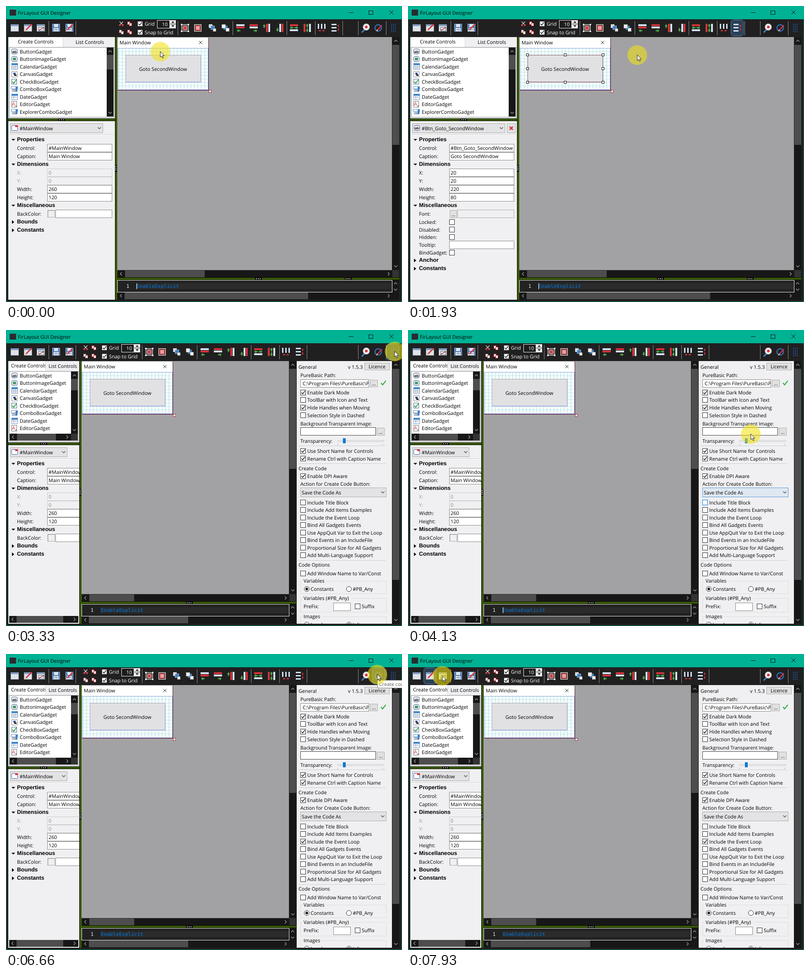
An HTML page that plays this animation: 865x648 px, repeating every 8 s.

```html
<!DOCTYPE html>
<html>
<head>
<meta charset="utf-8">
<style>
html, body { margin: 0; width: 865px; height: 648px; overflow: hidden; background: #1f1f1f; }
svg { display: block; }
text { font: 10.75px "Open Sans", "Noto Sans", sans-serif; text-rendering: geometricPrecision; white-space: pre; }
.b { font: bold 12.2px "Liberation Sans", sans-serif; }
.m { font: 11px "DejaVu Sans Mono", monospace; }
.k { font-weight: bold; }
</style>
</head>
<body>
<svg id="stage" width="865" height="648" viewBox="0 0 865 648"></svg>
<script>
const DARK = '#202020', FACE = '#f0f0f2', GREY = '#a2a2a4', RED = '#d8323c', BLUE = '#3f82c8', GREEN = '#4fae4a';

const rect = (x, y, w, h, fill, stroke, more = '') => stroke
  ? `<rect x="${x + .5}" y="${y + .5}" width="${w - 1}" height="${h - 1}" fill="${fill}" stroke="${stroke}" ${more}/>`
  : `<rect x="${x}" y="${y}" width="${w}" height="${h}" fill="${fill}" ${more}/>`;
const path = (d, stroke, width = 1, fill = 'none') =>
  `<path d="${d}" stroke="${stroke}" stroke-width="${width}" fill="${fill}"/>`;
// y is the middle of the line
const text = (x, y, s, fill = '#000', more = '') =>
  `<text x="${x}" y="${y + 4}" fill="${fill}" ${more}>${s}</text>`;
const mid = 'text-anchor="middle"';
const group = (id, body) => `<g id="${id}">${body}</g>`;
const move = (dx, body) => `<g transform="translate(${dx} 0)">${body}</g>`;
const clip = (x, y, w, h, body) =>
  `<svg x="${x}" y="${y}" width="${w}" height="${h}" viewBox="${x} ${y} ${w} ${h}">${body}</svg>`;
const chevron = (x, y, turn, color = '#a0a0a0') =>
  `<path d="M-3.5 2L0 -1.5L3.5 2" transform="translate(${x} ${y}) rotate(${turn})" fill="none" stroke="${color}" stroke-width="1.2"/>`;

const vbar = (x, y, h, from, to) => rect(x, y, 15, h, '#171717') + rect(x, from, 15, to - from, '#4d4d4d') +
  chevron(x + 7.5, y + 8, 0) + chevron(x + 7.5, y + h - 8, 180);
const hbar = (x, y, w, from, to) => rect(x, y, w, 15, '#171717') + rect(from, y, to - from, 15, '#4d4d4d') +
  chevron(x + 7, y + 7.5, -90) + chevron(x + w - 8, y + 7.5, 90);
const dots = (x, y, upright) => {
  let s = upright ? rect(x - 2, y - 7, 4, 15, '#000') : rect(x - 7, y - 2, 15, 4, '#000');
  for (let i = -5; i < 7; i += 4) s += upright ? rect(x - 1, y + i, 2, 2, '#ddd') : rect(x + i, y - 1, 2, 2, '#ddd');
  return s;
};
const hsplit = (x, y, w) => rect(x, y, w, 6, '#0c0f04') + rect(x, y + 1, w, 4, '#385a00');

const tick = (x, y, color = '#111', s = 1) => path(`M${x - 3.5 * s} ${y}l${2.5 * s} ${3 * s}l${5 * s} ${-6.5 * s}`, color, 1.4 * s);
const box = (x, y, on, id = '') => rect(x, y - 6, 12, 12, '#fff', '#333', id) + (on ? tick(x + 6, y) : '');
const field = (x, y, w, s = '', off) => rect(x, y - 9, w, 18, off ? FACE : '#fff', off ? '#ccc' : '#8a8a8a') +
  clip(x, y - 9, w, 18, text(x + 3, y, s, off ? '#888' : '#000'));
const button = (x, y, w, h, s) => rect(x, y, w, h, '#e1e1e1', '#adadad') + text(x + w / 2, y + h / 2, s, '#000', mid);
const combo = (x, y, w, more = '') => rect(x, y, w, 21, '#e3e3e5', '#adadad', more) + chevron(x + w - 8, y + 10.5, 180, '#444');

// Toolbar icons
const win = x => rect(x - 9, 40, 18, 16, '#dfe3e8', '#8e98a8') + rect(x - 8, 41, 16, 3, '#7d9cc8');
const pencil = x => path(`M${x - 5} 53L${x + 8} 40`, RED, 2.6) + path(`M${x - 7} 55l3 -3`, '#f0c890', 2);
const floppy = x => rect(x - 8, 39, 17, 17, '#4a78b0', '#9dbce0') + rect(x - 4, 40, 9, 6, '#dfe7f0') + rect(x - 5, 48, 11, 7, '#e4e8ee') +
  path(`M${x - 3} 50.5h7M${x - 3} 52.5h7`, '#6b84a4');
const line = x => rect(x, 33, 1, 31, '#8c8c8c');
const bar = (x, y, w, h, c) => rect(x, y, w, h, c);
const pages = (x, y, c) => rect(x - 5, y - 5, 6, 7, '#eee', c) + rect(x - 1, y - 2, 6, 7, '#fff', c);
const arrow = (x, y, turn) =>
  `<path d="M-4 0l4 -3.5v2.2h4v2.6h-4v2.2z" transform="translate(${x} ${y}) rotate(${turn})" fill="${GREEN}"/>`;
// Two bars, one red and one pale blue, with an arrow for the side they align to
const align = (x, turn, redFirst, arrowAt) => `<g transform="translate(${x} 48) rotate(${turn})">` +
  bar(-9, -8, 18, 4, redFirst ? RED : '#d5e2f2') + bar(-9, -3, 18, 4, redFirst ? '#d5e2f2' : RED) + '</g>' + arrowAt;

const fixedIcons = win(19) + win(48) + pencil(48) + win(76) + rect(71, 46, 12, 9, '#eef0f2', '#667') +
  path('M72 53l11 -6', '#a33', 1.5) + line(93) + floppy(109) + floppy(138) + pencil(138) + line(152) + line(769) +
  path('M783 52l-6 6', BLUE, 3) + '<circle cx="787" cy="46" r="6.5" fill="#f4f4f4" stroke="#d8dce4" stroke-width="2"/>' +
  '<circle cx="787" cy="46" r="3" fill="#d8323c"/>' +
  '<circle cx="813" cy="48" r="7" fill="none" stroke="#3568b0" stroke-width="2.6"/>' +
  path('M811 53l10 -11', RED, 2.6) + path('M809 55l3 -3', '#f0c890', 2) + line(830) +
  [842, 846, 850].map(x => [39, 43, 47, 51, 55].map(y => rect(x - 1, y, 2, 2, '#2258a8')).join('')).join('');

const slidingIcons = path('M248 34l8 8M256 34l-8 8', '#ddd', 1.2) +
  '<g fill="none" stroke="#d8323c" stroke-width="1.3"><circle cx="249" cy="42" r="1.6"/><circle cx="255" cy="42" r="1.6"/></g>' +
  pages(270, 39, RED) + pages(252, 57, '#a66') + pages(270, 57, RED) +
  box(287, 39, 1) + text(303, 39, 'Grid', '#fff') + box(287, 57.5, 1) + text(303, 57.5, 'Snap to Grid', '#fff') +
  rect(330, 31, 28, 18, '#1c1c1c', '#eee') + text(347, 40, '10', '#fff', mid) +
  rect(358, 31, 13, 8, '#eee') + rect(358, 40, 13, 9, '#eee') +
  path('M361 37l3.5 -4l3.5 4zM361 42l3.5 4l3.5 -4z', 'none', 0, '#222') + line(375) +
  rect(383, 40, 16, 16, '#6a5a5a', '#ddd') + '<circle cx="391" cy="48" r="4" fill="#d8323c" stroke="#f3c4c4"/>' +
  [382, 397].map(x => [39, 54].map(y => rect(x, y, 3, 3, '#fff')).join('')).join('') +
  rect(411, 40, 16, 16, '#7a4a4a', '#eee') + rect(414, 43, 10, 10, '#e9a0a0', RED) +
  rect(443, 40, 8, 8, '#ddd') + rect(447, 43, 9, 9, BLUE, '#8fb7e0') + rect(452, 49, 7, 7, '#eee', '#999') +
  rect(475, 43, 9, 9, BLUE) + rect(471, 40, 9, 9, '#eee', '#999') + rect(480, 48, 8, 8, '#fff', '#999') + line(495) +
  align(512, 0, 0, arrow(508, 54, 0)) + align(541, 0, 1, arrow(545, 54, 180)) +
  align(569, 90, 0, arrow(564, 44, 90)) + align(598, 90, 1, arrow(593, 52, -90)) + line(613) +
  rect(620, 40, 18, 4, RED) + rect(620, 51, 18, 4, '#d5e2f2') + arrow(624, 47.5, 0) + arrow(634, 47.5, 180) +
  rect(650, 39, 4, 18, RED) + rect(662, 39, 4, 18, '#d5e2f2') + arrow(658, 43, 90) + arrow(658, 53, -90) + line(675) +
  [682, 689, 696].map(x => rect(x - 1, 39, 3, 11, '#d5e2f2')).join('') + path('M683 54h5M691 54h5', RED, 2.4) +
  [40, 47, 54].map(y => rect(711, y - 1, 11, 3, '#d5e2f2')).join('') + path('M726 41v5M726 49v5', RED, 2.4) + line(735);

// Left panels
const gadgets = ['Button', 'ButtonImage', 'Calendar', 'Canvas', 'CheckBox', 'ComboBox', 'Date', 'Editor', 'ExplorerCombo', 'ExplorerList'];
const abIcon = (x, y) => rect(x - 6, y - 6, 13, 12, '#fff', '#2d4f80', 'rx="3"') +
  `<text x="${x + .5}" y="${y + 3}" ${mid} style="font:bold 8px sans-serif">ab</text>`;
const listIcon = y => rect(11, y - 6, 15, 6, '#fff', '#6f93c4') + rect(13, y, 10, 6, '#fff', '#6f93c4') +
  path(`M15 ${y + 3}h6`, '#222') + rect(21, y - 5, 4, 10, BLUE);
const icons = [
  y => abIcon(18, y),
  y => rect(12, y - 6, 13, 12, '#fff', '#2d4f80', 'rx="3"') + rect(15, y - 3, 7, 6, '#4a9a70'),
  y => rect(12, y - 7, 14, 14, '#fff', '#6f93c4') + rect(12, y - 7, 14, 4, BLUE) + path(`M13 ${y}h12M13 ${y + 3}h12M17 ${y - 3}v9M21 ${y - 3}v9`, '#9ab'),
  y => rect(12, y - 6, 13, 13, '#fff', '#555', 'stroke-dasharray="2 1"') + rect(16, y - 3, 5, 4, '#234a90') + rect(18, y + 1, 5, 3, '#222'),
  y => rect(12, y - 6, 12, 12, '#fff', '#4a6a90') + tick(18, y, '#1c9a3c', 1.2),
  listIcon,
  y => rect(12, y - 6, 14, 13, '#fff', '#6f93c4') + rect(12, y - 6, 14, 4, BLUE) + path(`M14 ${y + 1}h10M17 ${y - 2}v8`, '#89a'),
  y => rect(12, y - 7, 12, 14, '#fff', '#777') + text(13, y - 1, 'A', RED) + path(`M20 ${y + 4}h4`, '#222'),
  listIcon,
  listIcon
];

const controls = (edge, narrow) => {
  const end = narrow ? 142 : 219, bottom = narrow ? 227 : 243;
  const rows = gadgets.map((g, i) => icons[i](99.5 + 16.5 * i) + text(30, 99.5 + 16.5 * i, g + 'Gadget')).join('');
  return rect(5, 68, edge - 5, 178, FACE) + rect(5, 68, narrow ? 81 : 119, 22, '#fff') +
    clip(6, 69, narrow ? 80 : 118, 22, text(narrow ? 11 : 26, 78, 'Create Controls')) +
    rect(narrow ? 86 : 124, 69, 1, 20, '#d8d8d8') + text(narrow ? 93 : 152, 79, 'List Controls') +
    rect(7, 90, edge - 8, 154, '#fff', '#8a8a8a') + clip(8, 91, end - 8, bottom - 92, rows) +
    (narrow ? vbar(142, 91, 136, 107, 132) + rect(142, 227, 15, 15, '#333') + hbar(8, 227, 134, 24, 109)
            : vbar(220, 91, 151, 107, 139));
};

const head = (y, s, open) => path(open ? `M12 ${y - 1}h8l-4 4z` : `M13 ${y - 3}v8l5 -4z`, 'none', 0, '#000') + text(24, y, s, '#000', 'class="b"');
const row = (y, label, value, off) => text(24, y, label, off ? '#999' : '#000') + field(90, y, 142, value, off);
const properties = (edge, isButton, narrow) => {
  const pick = isButton ? '#Btn_Goto_SecondWindow' : '#MainWindow';
  const size = isButton ? [20, 20, 220, 80] : [0, 0, 260, 120];
  let s = rect(5, 252, edge - 5, 391, FACE) + combo(9, 257, narrow ? 125 : 203) + text(30, 267.5, pick) +
    (isButton ? abIcon(19, 267) : rect(12, 261, 14, 12, '#fff', '#3a68a8', 'rx="2"') + rect(20, 261, 6, 4, RED)) +
    rect(7, 281, edge - 8, 1, '#d0d0d0') + rect(7, 282, edge - 8, 1, '#fff') +
    head(292, 'Properties', 1) + row(311, 'Control:', pick) + row(329, 'Caption:', isButton ? 'Goto SecondWindow' : 'Main Window') +
    head(346, 'Dimensions', 1) +
    ['X:', 'Y:', 'Width:', 'Height:'].map((l, i) => row(365 + 18 * i, l, size[i], !isButton && i < 2)).join('') +
    head(436, 'Miscellaneous', 1);
  if (isButton) {
    s += text(24, 455, 'Font:') + button(91, 447, 16, 17, '...') + rect(108, 446, 124, 18, FACE, '#adadad') +
      ['Locked:', 'Disabled:', 'Hidden:'].map((l, i) => text(24, 473 + 16.5 * i, l) + box(90, 473 + 16.5 * i)).join('') +
      row(523, 'Tooltip:') + text(24, 540, 'BindGadget:') + box(90, 540) + head(556, 'Anchor') + head(574, 'Constants');
  } else {
    s += text(24, 455, 'BackColor:') + rect(91, 447, 16, 16, FACE, '#aaa') + path('M91.5 463v-15.5h15', '#777') + field(108, 455, 124) +
      head(472, 'Bounds') + head(490, 'Constants');
  }
  return clip(5, 252, edge - 5, 391, s) + (narrow ? hbar(7, 626, 151, 23, 125) : '');
};

// Form being designed, drawn at three quarters of its size
const grid = () => {
  let v = '', h = '';
  for (let i = 0; i < 27; i++) v += `M${246.5 + i * 7.5} 93v90`;
  for (let i = 0; i < 12; i++) h += `M245 ${92.5 + i * 7.5}h197`;
  return path(h, '#c2e6ea') + path(v, '#b4dfdf');
};
const form = () => rect(244, 69, 199, 116, '#f7fdfd') + grid() + rect(244, 69, 198, 23, '#fff') + text(248, 80, 'Main Window') +
  path('M421.5 76.5l7 7M428.5 76.5l-7 7', '#222') + rect(244, 92, 198, 1, '#7fa8dc') + rect(244, 92, 1, 92, '#8fb0e0') +
  rect(244, 183, 198, 1, '#6a6ac8') + rect(441, 92, 1, 92, '#8f9fe0') + rect(244, 184, 200, 1, '#6e2038') + rect(442, 69, 1, 116, '#4a2030') +
  rect(443, 184, 6, 6, '#fff', '#a8323c') +
  rect(261, 107, 165, 60, '#e1e1e3', '#a4a4b4') + rect(261, 166, 165, 1, '#8c8cdc') + rect(425, 107, 1, 60, '#a0a0dc') +
  text(343, 137.5, 'Goto SecondWindow', '#000', mid);
const handles = () => rect(261, 107, 165, 60, 'none', '#80606c') + rect(261, 166, 165, 1, '#8c3444') +
  [[0, 0], [1, 0], [2, 0], [0, 1], [2, 1], [0, 2], [1, 2], [2, 2]]
    .map(([i, j]) => rect(258 + 82.5 * i, 104 + 30 * j, 6, 6, '#fff', '#111')).join('');

const work = narrow => {
  const x = narrow ? 166 : 244, end = narrow ? 619 : 844, w = end - x;
  const edge = x - 6, full = w + 15;
  return rect(edge, 68, 5, 575, '#0c0f04') + rect(edge + 1, 68, 4, 575, '#385a00') + dots(edge + 2, 355, 1) +
    hsplit(5, 246, edge - 5) + dots(narrow ? 82 : 121, 249) +
    rect(x - 1, 68, w, 510, GREY) + vbar(end, 68, 510, 85, 304) + rect(x - 1, 578, full, 16, '#333') +
    hbar(x, 579, w, x + 16, narrow ? 280 : 434) + hsplit(x - 1, 594, full + 1) +
    (narrow ? dots(400, 597) : dots(551, 597) + dots(747, 597)) +
    rect(x - 1, 600, full, 43, '#171717') + rect(x - 1, 600, w + 1, 27, '#222', '#eee') + rect(x + 40, 607, w - 42, 13, '#2b2b2b') +
    text(x + 22, 613, '1', '#e4e4e4', 'class="m" ' + mid) + text(x + 41, 613, 'EnableExplicit', '#0d60a8', 'class="m k"') +
    chevron(end + 7, 607, 0) + chevron(end + 7, 621, 180) + hbar(x, 627, w, x + 15, narrow ? 398 : 660);
};

// Settings on the right
const option = (y, s, on, id) => box(643, y, on, id) + text(658, y, s);
const frame = (y, h, s) => rect(643, y, 188, h, 'none', '#dcdcdc') + rect(648, y - 5, s.length * 5.7, 10, FACE) + text(650, y, s);
const radio = (x, y, on, s) => `<circle cx="${x}" cy="${y}" r="5.5" fill="#fff" stroke="#333"/>` +
  (on ? `<circle cx="${x}" cy="${y}" r="3" fill="#222"/>` : '') + text(x + 8.5, y, s);
const rule = y => rect(639, y, 190, 1, '#cfcfcf');
const settings = () => rect(635, 68, 208, 575, FACE) + clip(636, 69, 207, 574,
  text(639, 81, 'General') + text(747, 81, 'v 1.5.3') + button(783, 72, 55, 16, 'Licence') +
  text(643, 99, 'PureBasic Path:') + rect(643, 108, 150, 18, '#fff', '#8a8a8a') +
  clip(644, 109, 148, 16, text(648, 117, 'C:\\Program Files\\PureBasic\\Program')) + button(795, 109, 17, 16, '...') + tick(824, 116, '#2aa83a', 1.4) +
  option(137, 'Enable Dark Mode', 1) + option(153, 'ToolBar with Icon and Text') +
  option(170, 'Hide Handles when Moving', 1) + option(186.5, 'Selection Style in Dashed') +
  text(643, 204.5, 'Background Transparent Image:', '#000', 'style="font-size:10.5px"') + rect(643, 213, 165, 18, '#fff', '#444') + button(810, 214, 17, 17, '...') +
  text(643, 243, 'Transparency:') + rect(724, 241, 102, 4, '#e7eaea', '#d0d0d0') + rect(736, 237, 6, 11, '#0078d7') +
  path('M724.5 249v3M822.5 249v3', '#aaa') + rule(253) +
  option(265, 'Use Short Name for Controls', 1) + option(281.5, 'Rename Ctrl with Caption Name', 1) + rule(292) +
  text(639, 302.5, 'Create Code') + option(320, 'Enable DPI Aware', 1) + text(643, 336.5, 'Action for Create Code Button:') +
  combo(643, 345, 188, 'id="save"') + text(646, 356, 'Save the Code As') +
  ['Include Title Block', 'Include Add Items Examples', 'Include the Event Loop', 'Bind All Gadgets Events',
    'Use AppQuit Var to Exit the Loop', 'Bind Events in an IncludeFile', 'Proportional Size for All Gadgets', 'Add Multi-Language Support']
    .map((s, i) => option(377.5 + 16.5 * i, s, 0, i === 0 ? 'id="titleBox"' : '')).join('') +
  group('loopTick', tick(649, 410.5)) + rule(504) +
  text(639, 514, 'Code Options') + option(533, 'Add Window Name to Var/Const') +
  frame(549, 29, 'Variables') + radio(657, 567, 1, 'Constants') + radio(749, 567, 0, '#PB_Any') +
  frame(587, 31, 'Variables (#PB_Any)') + text(650, 605, 'PreFix:') + rect(715, 597, 38, 18, '#fff', '#8a8a8a') + box(762, 605) + text(777, 605, 'Suffix') +
  frame(627, 30, 'Images') + radio(657, 645, 0, 'Local') + radio(749, 645, 1, 'Inline')) +
  rect(843, 68, 16, 575, '#171717') + vbar(844, 68, 575, 85, 547);

document.getElementById('stage').innerHTML =
  rect(0, 0, 865, 648, DARK) + rect(0, 0, 865, 29, '#00b294') + rect(8, 8, 14, 13, '#2b2b30') +
  text(26, 14.5, 'FirLayout GUI Designer') +
  path('M749 14.5h10M837.5 9.5l9 9M846.5 9.5l-9 9', '#111') + rect(792, 10, 10, 9, 'none', '#111') +
  rect(0, 29, 1, 619, '#0a7f6c') + rect(864, 29, 1, 619, '#0a7f6c') + rect(0, 647, 865, 1, '#0a7f6c') +
  rect(0, 30, 28, 36, '#2c4156', '#4f86bd', 'id="hover" rx="5"') + fixedIcons +
  group('wide', slidingIcons + controls(238) + group('winProps', properties(238)) + group('btnProps', properties(238, 1)) +
    group('remove', rect(216, 257, 19, 21, '#e3e3e5', '#adadad') + path('M222 264l7 7M229 264l-7 7', RED, 2.6)) +
    work() + form() + group('handles', handles())) +
  group('narrow', move(-78, slidingIcons) + controls(160, 1) + properties(160, 0, 1) + work(1) + move(-78, form()) + settings()) +
  rect(0, 607, 1, 13, '#fff', '', 'id="caret"') +
  group('tip', rect(811, 57, 70, 18, '#fff', '#767676') + text(815, 66, 'Create code', '#575757')) +
  group('mouse', '<circle cy="1" r="21.5" fill="#f2e218" opacity=".58"/>' +
    path('M0 .5v12.4l2.9 -2.6l2.1 4.8l2 -.9l-2.1 -4.6h4z', '#111', .9, '#fff'));

const $ = id => document.getElementById(id);
const show = (id, on) => $(id).style.display = on ? '' : 'none';

// Mouse stops: [tick, x, y], straight lines between
const stops = [[1, 337, 99], [13, 337, 135], [25, 337, 135], [37.5, 849, 46], [50, 849, 46], [74.2, 647, 411],
  [76, 647, 411], [88.5, 811, 44], [105, 811, 44], [119, 75, 47], [120, 75, 47]];
const mouseAt = n => {
  if (n <= stops[0][0]) return stops[0].slice(1);
  const i = stops.findIndex(s => s[0] >= n), [a, x, y] = stops[i - 1], [b, u, v] = stops[i];
  const k = (n - a) / (b - a);
  return [x + (u - x) * k, y + (v - y) * k];
};
// Highlighted tool button: [from, to, x]
const hovers = [[27, 40, 705], [40, 52, 831], [90, 107, 800], [113, 120, 34]];

function draw(t) {
  const n = Math.floor((t + 8) * 15 / 1000);
  const within = (a, b) => n >= a && n < b;
  const narrow = n >= 46, button = n >= 20;
  show('wide', !narrow);
  show('narrow', narrow);
  show('winProps', !button);
  show('btnProps', button);
  show('remove', within(20, 45));
  show('handles', within(17, 43));
  const h = hovers.find(([a, b]) => within(a, b));
  show('hover', h);
  if (h) $('hover').setAttribute('x', h[2] + .5);
  $('save').setAttribute('fill', within(59, 65) ? '#dfe8f2' : '#e3e3e5');
  $('save').setAttribute('stroke', within(59, 65) ? '#5a9bd5' : '#adadad');
  $('titleBox').setAttribute('stroke', within(61, 67) ? '#0078d7' : '#333');
  show('loopTick', n >= 74);
  show('tip', within(96, 105));
  $('tip').style.opacity = Math.min(1, (n - 95) / 5);
  const beat = Math.floor(n * .15 + .001);
  show('caret', beat % 2 === 0 || beat === 9);
  $('caret').setAttribute('x', narrow ? 207 : 285);
  $('mouse').setAttribute('transform', `translate(${mouseAt(n).map(v => v.toFixed(1)).join(' ')})`);
}

const start = performance.now();
function loop(now) {
  draw(Math.max(0, now - start) % 8000);
  requestAnimationFrame(loop);
}
draw(0);
requestAnimationFrame(loop);
</script>
</body>
</html>
```
